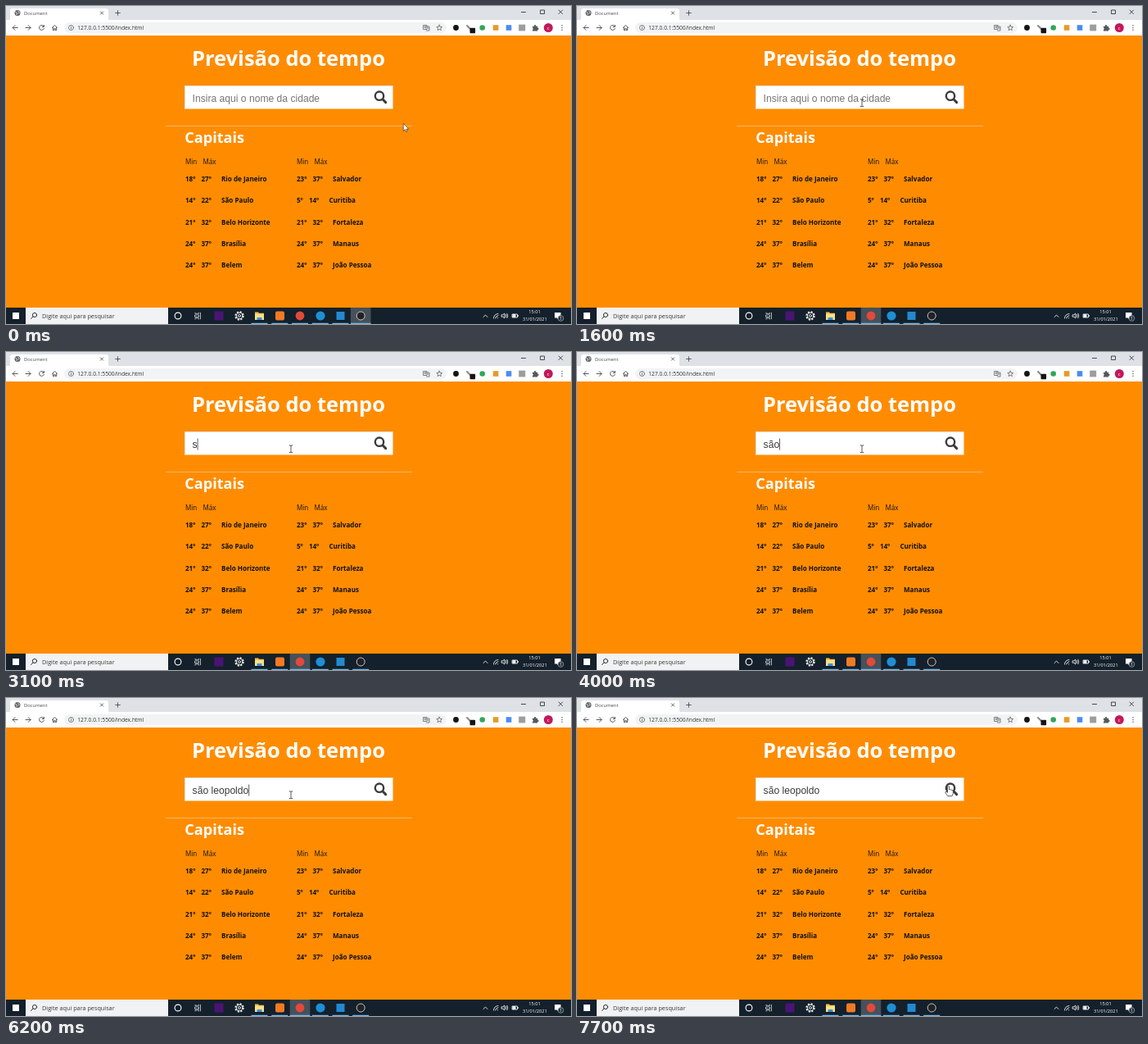
An HTML page for the animation above (8000 ms loop, 690 px wide and 388 px high).

```html
<!DOCTYPE html>
<html lang="pt-BR">
<head>
<meta charset="utf-8">
<title>Previsão do tempo</title>
<style>
  html, body { margin: 0; width: 100%; height: 100%; overflow: hidden; background: #ff8c00; }
  svg { display: block; }
  text { font-family: "Open Sans", sans-serif; white-space: pre; }
  .field { font: 12.12px "Liberation Sans", Arial, sans-serif; }
  .line { fill: none; stroke-linecap: round; stroke-linejoin: round; }
  .b { font-weight: 700; }
</style>
</head>
<body>
<svg id="stage" width="690" height="388" viewBox="0 0 690 388">
  <!-- browser -->
  <rect width="690" height="18" fill="#dee1e6"/>
  <path d="M2 18Q5 18 5 15V6Q5 3 8 3H122Q125 3 125 6V15Q125 18 128 18Z" fill="#fff"/>
  <rect y="17" width="690" height="19" fill="#fff"/>
  <circle cx="14" cy="8.5" r="3.5" fill="#5f6368"/>
  <path class="line" d="M11.5 7.2L13.5 8.5L13 10.5M14.5 6L16 7.5L15.5 9" stroke="#fff" stroke-width=".8"/>
  <text x="22" y="10.6" font-size="5.85" fill="#45494d">Document</text>
  <g class="line" stroke="#3c4043" stroke-width=".8">
    <path d="M115.3 6.8l3.4 3.4m0-3.4l-3.4 3.4M133.7 8.5h5.6M136.5 5.7v5.6"/>
    <path d="M629.5 7.5h5M653 5h4.5v4.5H653zM675 5l4.6 4.6m0-4.6L675 9.6" stroke="#222"/>
  </g>
  <g class="line" stroke="#55595e" stroke-width="1">
    <path d="M14.2 26.5H8.2m2.8-2.9l-2.9 2.9l2.9 2.9"/>
    <path d="M24 26.5h6m-2.8-2.9l2.9 2.9l-2.9 2.9"/>
    <path d="M46 24.6A3 3 0 1 0 46.4 27.4M46.4 23.4v2.1h-2.1"/>
    <path d="M56.5 26.3l3-2.8l3 2.8M57.4 26v3.6h1.5v-2h1.3v2h1.5V26"/>
  </g>
  <rect x="71" y="20" width="467" height="13" rx="6.5" fill="#f1f3f4"/>
  <g class="line" stroke="#5f6368" stroke-width=".8">
    <circle cx="79.5" cy="26.5" r="3"/>
    <path d="M79.5 26.2v1.8M79.5 24.8v.1"/>
    <path d="M510 23.5h4v5h-4zM514 25h3v5h-3.5M511 25.4h2M512 25v2M515 27h1.3"/>
    <path d="M529.2 23.2l1 2.2l2.4.2l-1.8 1.6l.5 2.4l-2.1-1.3l-2.1 1.3l.5-2.4l-1.8-1.6l2.4-.2z"/>
  </g>
  <text x="87.3" y="28.9" font-size="6.7" fill="#303438">127.0.0.1:5500/index.html</text>
  <circle cx="549.5" cy="26.5" r="3.4" fill="#151515"/>
  <path class="line" d="M563 24l4 4" stroke="#888" stroke-width="2"/>
  <rect x="566.5" y="26.7" width="6.6" height="6.6" rx="1" fill="#151515"/>
  <circle cx="581.7" cy="26.5" r="3.3" fill="#2fa75a"/>
  <rect x="594.8" y="23.2" width="6.6" height="6.6" fill="#e79a28"/>
  <rect x="610.7" y="23.2" width="6.6" height="6.6" fill="#4c8bf0"/>
  <rect x="626.2" y="22.6" width="8" height="7.8" fill="#9b9da0"/>
  <path d="M643 24.7h2v-.6a1.1 1.1 0 0 1 2.2 0v.6h2v2h.4a1.1 1.1 0 0 1 0 2.2h-.4v1.6H643v-1.8a1.1 1.1 0 0 0 0-2.1z" fill="#55595e"/>
  <circle cx="662.3" cy="26.5" r="5.5" fill="#c2185b"/>
  <text x="662.3" y="28.5" font-size="6" fill="#fff" text-anchor="middle">c</text>
  <path class="line" d="M679 23.8v.01M679 26.5v.01M679 29.2v.01" stroke="#55595e" stroke-width="1.5"/>

  <!-- page -->
  <rect y="36" width="690" height="332" fill="#ff8c00"/>
  <text class="b" x="345" y="72.6" font-size="25.5" fill="#fff" text-anchor="middle">Previsão do tempo</text>
  <rect x="218" y="97" width="254.5" height="28.5" fill="#fff"/>
  <path d="M218.3 125.2V97.3H472.3" fill="none" stroke="#c9b69b" stroke-width=".6"/>
  <text id="entry" class="field" x="227.6" y="116.8"></text>
  <path id="caret" d="M0 105.5V119.5" stroke="#333" stroke-width=".8"/>
  <g class="line" stroke="#3b3b3b">
    <circle cx="456" cy="109.7" r="5.2" stroke-width="2.4"/>
    <path d="M460.2 114l3.5 3.6" stroke-width="3"/>
  </g>
  <path d="M195 146.4H496" stroke="#f0c27c" stroke-width=".8"/>
  <text class="b" x="218.3" y="167" font-size="18.1" fill="#fff">Capitais</text>
  <g id="cities" font-size="8.08" fill="#111"></g>

  <!-- taskbar -->
  <rect y="368" width="690" height="20" fill="#14202b"/>
  <rect x="24" y="368" width="174" height="20" fill="#f1f2f3"/>
  <rect x="8" y="374" width="8" height="8" fill="#fff"/>
  <g class="line" stroke="#222" stroke-width=".9"><circle cx="35" cy="377" r="2.6"/><path d="M33 379l-2.4 2.5"/></g>
  <text x="44" y="380.7" font-size="7.28" fill="#3a3a3a">Digite aqui para pesquisar</text>
  <g id="apps"></g>
  <circle class="line" cx="210" cy="378" r="3.9" stroke="#fff" stroke-width="1.1"/>
  <path class="line" d="M231 374.3v1h4.5v-1M231 377h4.5v2.5H231zM231 382v-1h4.5v1M237.5 374.3v7.5" stroke="#ddd" stroke-width=".8"/>
  <rect x="254.5" y="372.5" width="11" height="11" fill="#4a1475"/>
  <g class="line" stroke="#eee">
    <circle cx="285" cy="378" r="4.7" stroke-width="2" stroke-dasharray="2.1 1.59" stroke-linecap="butt"/>
    <circle cx="285" cy="378" r="3.7" stroke-width=".9"/>
    <circle cx="285" cy="378" r="1.5" stroke-width=".9"/>
  </g>
  <path d="M304 373.5h4l1 1.2h6V383h-11z" fill="#f4c443"/>
  <path d="M304 376h11v7h-11z" fill="#ffe08a"/>
  <path d="M306.5 383v-3h6v3z" fill="#3d8fd3"/>
  <rect x="329" y="372.5" width="11" height="11" rx="2" fill="#f27a24"/>
  <circle cx="359" cy="378" r="5.4" fill="#e2493b"/>
  <circle cx="384" cy="378" r="5.6" fill="#1e8fd5"/>
  <rect x="403.5" y="373" width="10" height="10" fill="#2289d1"/>
  <circle cx="433.2" cy="378" r="5" fill="#222126" stroke="#d5d5d5" stroke-width=".9"/>
  <g class="line" stroke="#eee" stroke-width=".9">
    <path d="M583 379.5l2.5-2.5l2.5 2.5"/>
    <path d="M595.5 381a6 6 0 0 1 5.5-5.5M597.7 381a4 4 0 0 1 3.3-3.3M600.5 380.5v.3"/>
    <path d="M605.5 376.8h1.3l2-1.8v6l-2-1.8h-1.3zM610.5 376.5q1 1.5 0 3M612 375.3q1.8 2.7 0 5.4"/>
    <path d="M618.5 376h6v4h-6z"/>
  </g>
  <path d="M618.5 376h4v4h-4zM625 377h.8v2H625z" fill="#eee"/>
  <g font-size="5.6" fill="#fff" text-anchor="middle">
    <text x="645.5" y="375.4">15:01</text>
    <text x="645.8" y="384.3">31/01/2021</text>
  </g>
  <path d="M670 374h7.5v6.5H675l-1.5 1.8v-1.8H670z" fill="#fff"/>
  <circle cx="677.5" cy="381" r="3.4" fill="#26333d" stroke="#ddd" stroke-width=".5"/>
  <text x="677.5" y="383" font-size="5" fill="#fff" text-anchor="middle">1</text>

  <!-- pointers, hot spot at 0,0 -->
  <g id="arrow"><path d="M0 0V9.2L2.1 7.3L3.5 10.3L4.9 9.7L3.6 6.8H6.4Z" fill="#fff" stroke="#222" stroke-width=".6"/></g>
  <g id="beam"><path class="line" d="M-1.9-4.3H-.5L0-3.8L.5-4.3H1.9M0-3.8V3.8M-1.9 4.3H-.5L0 3.8L.5 4.3H1.9" stroke="#222" stroke-width=".75"/></g>
  <g id="hand"><path d="M-1 0Q0-1.2 1 0V4Q2 3.3 2.7 4.3Q3.8 3.6 4.4 4.7Q5.8 4.4 5.8 6V8.5L4.6 11.8H-.9L-3.7 7.4Q-3.7 6-2.4 6.4L-1 7.6Z" fill="#fff" stroke="#222" stroke-width=".7"/></g>
</svg>
<script>
const $ = id => document.getElementById(id);
const LOOP = 8000, CLICK = 800, CLEAR = 2000, SWITCH = 1500;
const phrase = "são leopoldo";
const keyTimes = [CLEAR, 3200, 3900, 4100, 4400, 4700, 4800, 5200, 5600, 6000, 6100, 6200];

const columns = [
  [219, "18 27 Rio de Janeiro", "14 22 São Paulo", "21 32 Belo Horizonte", "24 37 Brasília", "24 37 Belem"],
  [355, "23 37 Salvador", "5 14 Curitiba", "21 32 Fortaleza", "24 37 Manaus", "24 37 João Pessoa"]
];
const label = (x, y, s, bold) => `<text x="${x}" y="${y}"${bold ? ' class="b"' : ""}>${s}</text>`;
$("cities").innerHTML = columns.map(([x, ...rows]) =>
  label(x, 192.8, "Min") + label(x + 21.5, 192.8, "Máx") +
  rows.map((row, i) => {
    const [min, max, ...name] = row.split(" ");
    const y = 214 + i * 26.25, shift = min.length < 2 ? -4.6 : 0;
    return label(x, y, min + "º", 1) + label(x + 19.5 + shift, y, max + "º", 1) +
      label(x + 44 + shift, y, name.join(" "), 1);
  }).join("")).join("");

const openApps = [309.5, 334.3, 359, 383.8, 408.5, 433.2];
function drawApps(active) {
  $("apps").innerHTML = openApps.map((x, i) => {
    const on = i === active, w = on ? 24.6 : 20;
    return (on ? `<rect x="${x - 12.3}" y="368" width="24.6" height="20" fill="#46515a"/>` : "") +
      `<rect x="${x - w / 2}" y="386.8" width="${w}" height="1.2" fill="#76b9ed"/>`;
  }).join("");
}

const progress = (t, a, b) => {
  const p = Math.min(1, Math.max(0, (t - a) / (b - a)));
  return p * p * (3 - 2 * p);
};
const mix = (a, b, p) => a + (b - a) * p;

function pointer(t) {
  if (t < 6600) {
    const p = progress(t, 50, 750);
    return [mix(485.3, 348, p), mix(143.3, 118.2, p)];
  }
  const p = progress(t, 6600, 7450), q = progress(t, 7500, 7700);
  return [mix(348, 456, p) - 2.5 * q, mix(118.2, 109.5, p) - 11 * Math.sin(Math.PI * p) - 1.7 * q];
}

let activeApp = -1;
function draw(t) {
  const app = t < SWITCH ? 5 : 2;
  if (app !== activeApp) drawApps(activeApp = app);

  const typed = keyTimes.filter(k => k <= t).length;
  const entry = $("entry");
  entry.textContent = typed ? phrase.slice(0, typed) : "Insira aqui o nome da cidade";
  entry.setAttribute("fill", typed ? "#3a3a3a" : "#757575");

  // the caret blink restarts at each key press
  const since = t - (typed ? keyTimes[typed - 1] : CLICK);
  const caretX = 228 + (typed ? entry.getComputedTextLength() : 0);
  $("caret").setAttribute("transform", `translate(${caretX} 0)`);
  $("caret").style.display = since >= 0 && since % 1000 < 500 ? "" : "none";

  const [x, y] = pointer(t);
  const inField = x > 218 && x < 472 && y > 97 && y < 125.5;
  const shape = !inField ? "arrow" : x > 442 ? "hand" : "beam";
  for (const id of ["arrow", "beam", "hand"]) {
    $(id).style.display = id === shape ? "" : "none";
    $(id).setAttribute("transform", `translate(${x} ${y})`);
  }
}

function frame() {
  draw(performance.now() % LOOP);
  requestAnimationFrame(frame);
}
frame();
</script>
</body>
</html>
```
